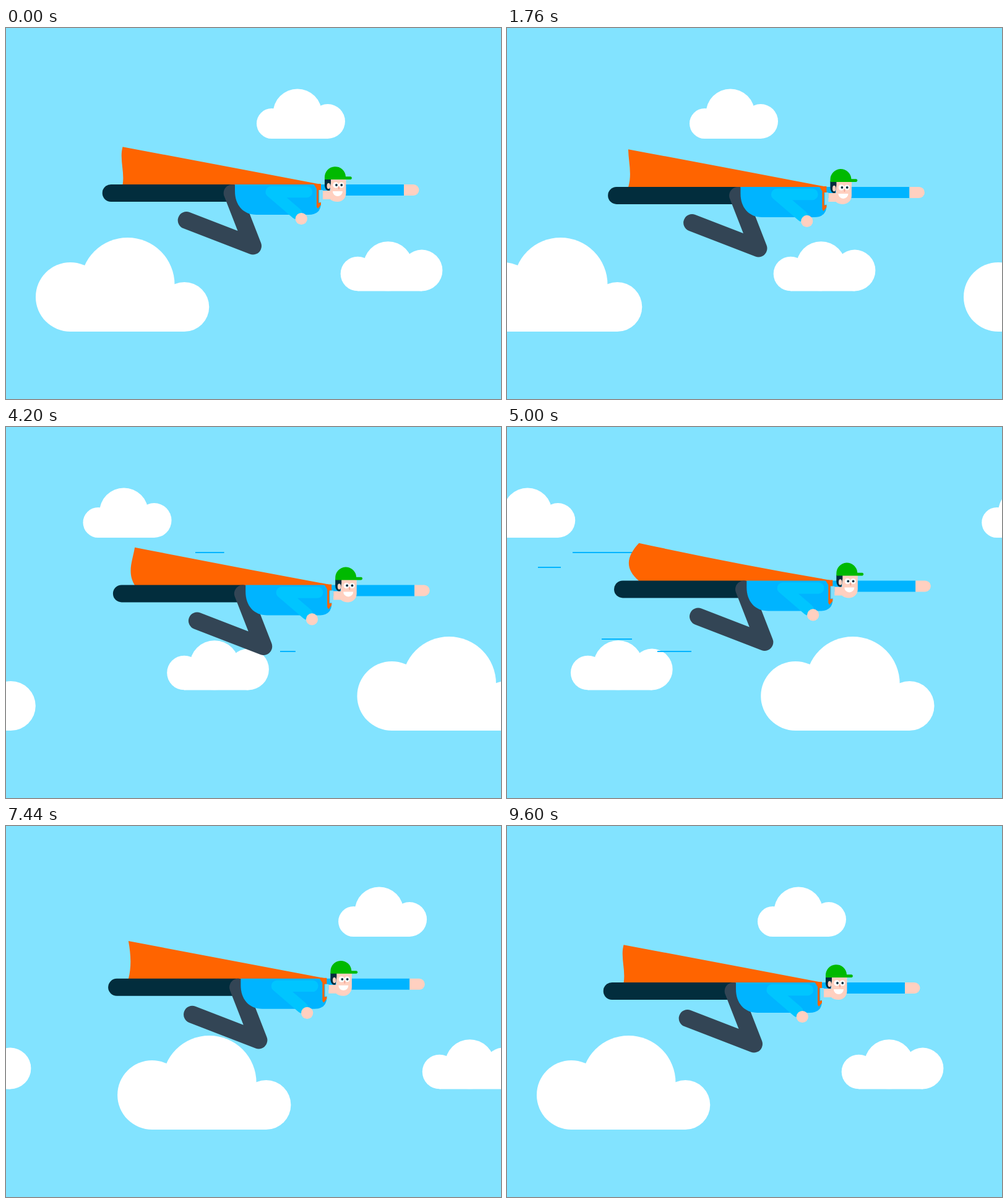
Animation of 800x600 px, one loop 9.64 s. Source, as an HTML page:

```html
<!DOCTYPE html>
<html lang="en">
<head>
<meta charset="utf-8">
<title>Flying hero</title>
<style>
html, body { margin: 0; width: 100%; height: 100%; overflow: hidden; background: #82e3ff; }
svg { display: block; width: 800px; height: 600px; }
</style>
</head>
<body>
<svg viewBox="0 0 800 600">
  <defs>
    <g id="far" fill="#fff">
      <circle cx="429.5" cy="154.5" r="24.5"/><circle cx="471" cy="138" r="39.5"/>
      <circle cx="520" cy="151" r="28"/><path d="M429.5 140H520V179H429.5Z"/>
      <circle cx="568.5" cy="397.5" r="27.8"/><circle cx="617.5" cy="385.3" r="40"/>
      <circle cx="672" cy="392" r="33.4"/><path d="M568.5 385H672V425.4H568.5Z"/>
    </g>
    <g id="near" fill="#fff">
      <circle cx="104" cy="435" r="56"/><circle cx="196.5" cy="415" r="76"/>
      <circle cx="288.3" cy="451" r="40"/><path d="M104 420H288.3V491H104Z"/>
    </g>
  </defs>
  <use class="leaving" href="#far"/><use class="coming" href="#far"/>
  <path id="lines" stroke="#00b4ff" stroke-width="2"/>
  <g id="man">
    <path id="cape" fill="#ff6400"/>
    <path d="M508 253H643V271H508Z" fill="#00b4ff"/>
    <path d="M643 253H658.5A9 9 0 0 1 658.5 271H643Z" fill="#ffd0c0"/>
    <g fill="none" stroke-width="28" stroke-linecap="round" stroke-linejoin="round">
      <path d="M169.7 267H366" stroke="#022d3d"/>
      <path d="M365.7 267L399 352.5L291.7 311" stroke="#334555"/>
    </g>
    <path d="M370 253H497Q509 253 509 265V283Q509 302 489 302H405C383 302 370 286 370 264Z" fill="#00b4ff"/>
    <path d="M486 265H428.7L469.5 300" fill="none" stroke="#00c5ff" stroke-width="18.5" stroke-linecap="round" stroke-linejoin="round"/>
    <circle cx="477.3" cy="308.5" r="9.6" fill="#ffd0c0"/>
    <path d="M497 252H509V262H505V283L509 282V286L504 292L502 289V260Z" fill="#ff6400"/>
    <path d="M506 262H512V277L508.5 282H506Z" fill="#82dfff"/>
    <path d="M512 263H524V244H549.5V267A13.5 14 0 0 1 536 281Q528 281 524 277H512Z" fill="#ffd0c0"/>
    <path d="M515 244H525V250L523 263H520Q515 261 515 254Z" fill="#022d3d"/>
    <ellipse cx="521.3" cy="255.5" rx="2.7" ry="4.7" fill="#ffd0c0"/>
    <path d="M515 245V242A17 17 0 0 1 549 240.3H557A2.4 2.4 0 0 1 557 245Z" fill="#00b900"/>
    <g fill="#fff">
      <circle cx="533" cy="254" r="4.7"/><circle cx="542" cy="254" r="4.5"/>
      <path d="M528 264H544A8 8 0 0 1 528 264Z"/>
    </g>
    <g fill="#022d3d"><circle cx="534" cy="254" r="1.9"/><circle cx="542.3" cy="254" r="1.9"/></g>
    <path d="M538 257V260" stroke="#f0a596" stroke-width="2" stroke-linecap="round"/>
  </g>
  <use class="leaving" href="#near"/><use class="coming" href="#near"/>
</svg>
<script>
const LOOP = 9640, END = 9600, STEP = 40;
const RUSH = [3830, 5830];
const LINES = [[106, 103, 203], [50, 37, 227], [153, 49, 343], [243, 55, 363]];
const { sin, cos, PI, min, max, floor } = Math;

const $ = id => document.getElementById(id);
const part = (t, a, b) => max(0, min(1, (t - a) / (b - a)));
const ease = (t, a, b) => { const u = part(t, a, b); return u * u * (3 - 2 * u); };
const moveAll = (name, x) => document.querySelectorAll('.' + name)
  .forEach(el => el.setAttribute('transform', `translate(${x} 0)`));

// Steady drift plus a burst of speed; the next clouds run a little ahead after it.
function drawClouds(t) {
  const shift = t / 16 + 200 * ease(t, ...RUSH);
  const lead = 12 * ease(t, 5000, 6000) * ((END - t) / 3480) ** 3;
  moveAll('leaving', -shift);
  moveAll('coming', 800 - shift - lead);
}

function drawMan(t) {
  const w = 2 * PI * t / END;
  const x = 8.7 * (1 - cos(w)) + 1.2 * (1 - cos(2 * w)) + 0.3 * sin(w);
  const y = 7 * ease(t, 0, 3250) - 16.5 * ease(t, 3250, 6000) + 9.5 * ease(t, 6000, END);
  $('man').setAttribute('transform', `translate(${x} ${y})`);
}

// The hem ripples ten times per loop and billows during the rush.
function drawCape(t, rush) {
  const a = 2.55 + 20 * PI * t / END;
  const tip = 188.5 + 8 * rush;
  const up = tip + 6.5 * cos(a) - 15 * rush, low = tip + 6.5 * sin(a) - 22 * rush;
  $('cape').setAttribute('d', `M504 252Q${(504 + tip) / 2} ${222 + 4 * rush} ${tip} 192.2` +
    `C${up} 212.5 ${low} 232.5 ${tip} 253.5H504Z`);
}

function drawLines(t, rush) {
  const grow = min(1, 1.5 * rush), back = (t - 5000) / 4;
  $('lines').setAttribute('d', grow ?
    LINES.map(([x, len, y]) => `M${x - back} ${y}h${len * grow}`).join('') : '');
}

function draw(now) {
  const t = min(floor((now % LOOP) / STEP) * STEP, END);
  const rush = sin(PI * part(t, ...RUSH)) ** 2;
  drawClouds(t);
  drawMan(t);
  drawCape(t, rush);
  drawLines(t, rush > 1e-6 ? rush : 0);
}

const start = performance.now();
function tick() {
  draw(performance.now() - start);
  requestAnimationFrame(tick);
}
tick();
</script>
</body>
</html>
```
